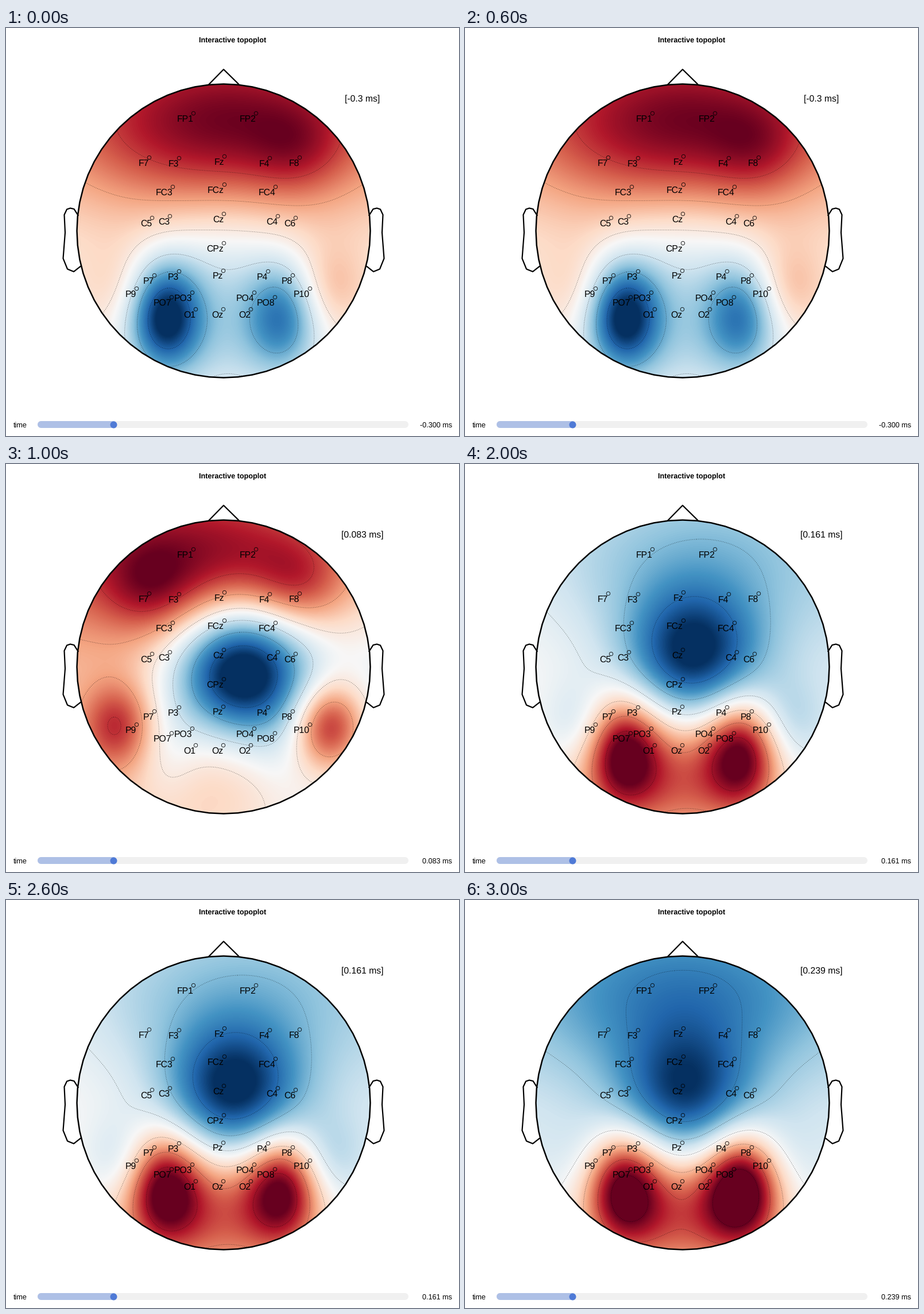
A matplotlib script that plays this animation: 789 by 710 pixels, repeating every 4000 ms.

```python
import numpy as np
import matplotlib.pyplot as plt
from matplotlib.animation import ArtistAnimation
from matplotlib.patches import Polygon

W, H, DPI = 789, 710, 100
PX = 72 / DPI                      # points per pixel
CX, CY, R = 379, 353, 255.5        # head circle
plt.rcParams["font.family"] = "Liberation Sans"
plt.rcParams["text.hinting"] = "none"

# Left/right electrode names: half distance between them, height on stage
PAIRS = {
    "FP1 FP2": (54.5, 148), "F7 F8": (131, 225), "F3 F4": (79, 226),
    "FC3 FC4": (89.5, 276), "C5 C6": (125, 330), "C3 C4": (94, 326.5),
    "P7 P8": (120.5, 430), "P3 P4": (77.5, 423), "P9 P10": (151, 453),
    "PO7 PO8": (90, 468), "PO3 PO4": (54, 459.5), "O1 O2": (48, 488.5),
}
MIDLINE = {"Fz": 223, "FCz": 272, "Cz": 322.5, "CPz": 374, "Pz": 421.5, "Oz": 489}
CAP_SKEW = 0.008                   # the cap leans slightly to the right

# Each step: weights of the scalp sources, in head radii where they are places
STEPS = [
    dict(stamp="-0.300", readout="-0.3", base=.12, tilt=0, front=.85,
         focus=(0, -.2), vertex=-.2, inion=-.35,
         frontal=(0, .18), occipital=(-.98, -.6), temporal=(.15, .25)),
    dict(stamp="0.083", readout="0.083", base=.05, tilt=-.18, front=.85,
         focus=(.12, -.02), vertex=-1.35, inion=.2,
         frontal=(.25, .25), occipital=(-.2, -.1), temporal=(.55, .8)),
    dict(stamp="0.161", readout="0.161", base=-.06, tilt=-.08, front=-.35,
         focus=(.07, .07), vertex=-.95, inion=.67,
         frontal=(0, 0), occipital=(.8, .8), temporal=(-.25, -.25)),
    dict(stamp="0.239", readout="0.239", base=-.15, tilt=0, front=-.55,
         focus=(.02, .03), vertex=-.75, inion=.8,
         frontal=(0, 0), occipital=(.85, 1), temporal=(-.1, -.1)),
]

STEP = 2
axis = np.arange(-258, 259, STEP)
u, v = np.meshgrid(axis / R, -axis / R)
inside = np.hypot(u, v) <= 1


def bump(x, y, width, height):
    return np.exp(-((u - x) / width) ** 2 - ((v - y) / height) ** 2)


def mirrored(weights, x, *shape):
    left, right = weights
    return left * bump(-x, *shape) + right * bump(x, *shape)


def scalp_field(s):
    return (s["base"] + s["tilt"] * u
            + s["front"] * bump(0, .75, 1.2, .6)
            + s["vertex"] * bump(*s["focus"], .45, .45)
            + s["inion"] * bump(0, -.75, .7, .5)
            + mirrored(s["frontal"], .5, .55, .3, .3)
            + mirrored(s["occipital"], .4, -.58, .24, .36)
            + mirrored(s["temporal"], .72, -.4, .25, .3))


fig = plt.figure(figsize=(W / 100, H / 100), dpi=DPI, facecolor="white")
ax = fig.add_axes([0, 0, 1, 1])
ax.axis("off")


def label(x, y, text, size, **kw):
    return ax.text(x, y, text, fontsize=size * PX, color="black",
                   va="baseline", zorder=6, **kw)


def stroke(points, width, color="black", **kw):
    ax.plot(*np.array(points).T, color=color, lw=width * PX, **kw)


def electrode(name, offset, y):
    x = CX + offset + CAP_SKEW * (CY - y)
    ax.plot(x, y, "o", ms=6.4 * PX, mfc="none", mec="black", mew=0.8 * PX, zorder=5)
    label(x, y + 15, name, 15.8, ha="right")


# Head, nose and ears
angles = np.linspace(0, 2 * np.pi, 64, endpoint=False)
rim = np.column_stack([CX + R * np.cos(angles), CY + R * np.sin(angles)])
head = Polygon(rim, fill=False, ec="black", lw=2.5 * PX, zorder=4)
ax.add_patch(head)
stroke([(354, 97.5), (379, 72), (405, 97.5)], 2.2, zorder=4)
ear = np.array([(125.5, 326), (118.5, 315), (112, 313.5), (106, 315.5),
                (101.5, 325), (103, 356), (99.5, 401), (107, 419.5),
                (118, 424), (129.5, 415)])
stroke(ear, 2.2, zorder=4)
stroke((2 * CX, 0) + ear * (-1, 1), 2.2, zorder=4)

for names, (offset, y) in PAIRS.items():
    left, right = names.split()
    electrode(left, -offset, y)
    electrode(right, offset, y)
for name, y in MIDLINE.items():
    electrode(name, 0, y)

# Title and slider
label(394.5, 25, "Interactive topoplot", 12.6, ha="center", weight="bold")
label(12.5, 695, "time", 12.6, ha="left")
TRACK_Y, THUMB_X = 690, 187
for end, color in ((695.5, "#f0f0f0"), (THUMB_X, "#aec0e6")):
    stroke([(61, TRACK_Y), (end, TRACK_Y)], 12, color, solid_capstyle="round")
ax.plot(THUMB_X, TRACK_Y, "o", ms=12 * PX, color="#4f7ad6", mew=0)


def draw_step(s):
    field = scalp_field(s)
    edge = axis[-1] + STEP / 2
    image = ax.imshow(field, cmap="RdBu_r", vmin=-1, vmax=1, aspect="auto",
                      interpolation="bilinear", zorder=1,
                      extent=(CX - edge, CX + edge, CY + edge, CY - edge))
    levels = np.linspace(field[inside].min(), field[inside].max(), 8)[1:-1]
    lines = ax.contour(CX + axis, CY + axis, field, levels=levels, colors="black",
                       linewidths=0.85 * PX, alpha=0.6, zorder=2)
    lines.set_linestyle((0, (1.2, 2.2)))
    for artist in (image, lines):
        artist.set_clip_path(head)
    return [image, lines,
            label(620.5, 127.5, f"[{s['readout']} ms]", 15.8, ha="center"),
            label(776.7, 695, f"{s['stamp']} ms", 12.6, ha="right")]


frames = [draw_step(s) for s in STEPS]
ax.set(xlim=(0, W), ylim=(H, 0))
anim = ArtistAnimation(fig, frames, interval=1000, repeat=True, repeat_delay=0)
plt.show()
```
